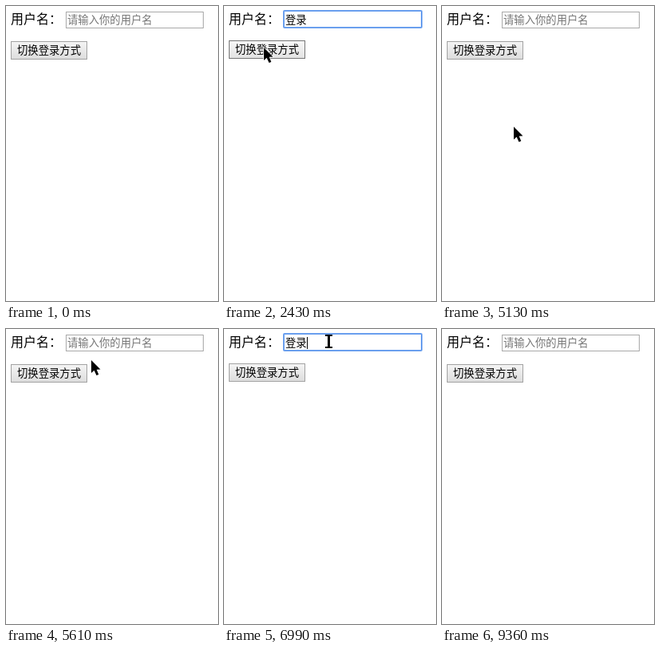
An HTML page with a canvas that plays this animation: 266x369 px, repeating every 9840 ms.

```html
<!DOCTYPE html>
<html lang="zh-CN">
<head>
<meta charset="utf-8">
<title>切换登录方式</title>
<style>
html, body { margin: 0; width: 100%; height: 100%; overflow: hidden; background: #fff; }
canvas { display: block; }
</style>
</head>
<body>
<canvas id="stage" width="266" height="369"></canvas>
<script>
const ctx = document.getElementById('stage').getContext('2d', { alpha: false });
const LOOP = 9840, TICK = 30, BLINK = 510, PRESS = 60;
const FONT = '"Noto Sans CJK SC", "Noto Sans CJK", sans-serif';
const ARROW = new Path2D('M0 0V16L3.6 12.7L6.5 19L9.3 18L6.7 11.7L11.5 11.5Z');
const BUTTON = { x: 6, w: 96, h: 23 }, FIELD = { w: 173, h: 21 };

// Two visits to the form: the first keeps its text when the login type changes, the second drops it.
const visits = [
  { focus: 510, type: 1920, toMail: 2820, toName: 3750, clear: 4800 },
  { focus: 6240, type: 6810, toMail: 7650, toName: 8370, clear: 7650 }
];

// Pointer moves: start, end, goal
const moves = [
  { from: 60, to: 330, x: 145, y: 20 },
  { from: 1230, to: 1350, x: 146, y: 18 },
  { from: 2100, to: 2400, x: 49, y: 51 },
  { from: 4770, to: 4800, x: 70, y: 164 },
  { from: 4800, to: 5130, x: 89, y: 150 },
  { from: 5130, to: 5610, x: 106, y: 38 },
  { from: 5610, to: 5910, x: 140, y: 9 },
  { from: 6060, to: 6210, x: 136, y: 13 },
  { from: 6960, to: 6990, x: 131, y: 15 },
  { from: 6990, to: 7140, x: 50, y: 52 },
  { from: 9180, to: 9360, x: 275, y: 31 }
];

const between = (t, a, b) => t >= a && t < b;
const ease = k => k * k * (3 - 2 * k);

function pointerAt(t) {
  let x = 228, y = 25;
  for (const m of moves) {
    const k = ease(Math.min(1, Math.max(0, (t - m.from) / (m.to - m.from))));
    x += (m.x - x) * k;
    y += (m.y - y) * k;
  }
  return { x: Math.round(x), y: Math.round(y) };
}

function fill(color, x, y, w, h) {
  ctx.fillStyle = color;
  ctx.fillRect(x, y, w, h);
}

function frame(color, x, y, w, h) {
  ctx.strokeStyle = color;
  ctx.lineWidth = 1;
  ctx.strokeRect(x + 0.5, y + 0.5, w - 1, h - 1);
}

function text(str, x, y, size, color) {
  ctx.font = '350 ' + size + 'px ' + FONT;
  ctx.fillStyle = color;
  ctx.fillText(str, x, y);
}

function drawField(x, y, value, hint, focus) {
  frame('#a9a9a9', x, y, FIELD.w, FIELD.h);
  if (focus) {
    ctx.strokeStyle = '#6a9fee';
    ctx.lineWidth = 2;
    ctx.beginPath();
    ctx.roundRect(x, y, FIELD.w, FIELD.h, 1);
    ctx.stroke();
  }
  text(value || hint, x + 2, 22, 13.333, value ? '#000' : '#757575');
}

function drawButton(y, hover, down) {
  const { x, w, h } = BUTTON;
  const shade = ctx.createLinearGradient(0, y, 0, y + h);
  const stops = down ? ['#d5d5d5', '#e9e9e9'] : hover ? ['#f8f8f8', '#e2e2e2'] : ['#f5f5f5', '#dcdcdc'];
  stops.forEach((c, i) => shade.addColorStop(i, c));
  fill(shade, x, y, w, h);
  frame(hover ? '#777' : '#a2a2a2', x, y, w, h);
  text('切换登录方式', x + 8, y + 16, 13.333, '#000');
}

function drawBeam(x, y) {
  fill('#000', x - 4, y - 8, 9, 2);
  fill('#000', x - 4, y + 7, 9, 2);
  fill('#000', x - 1, y - 7, 3, 15);
}

function drawArrow(x, y) {
  ctx.save();
  ctx.translate(x + 1, y + 1);
  ctx.strokeStyle = '#fff';
  ctx.lineWidth = 1.5;
  ctx.stroke(ARROW);
  ctx.fillStyle = '#000';
  ctx.fill(ARROW);
  ctx.restore();
}

function draw(t) {
  const v = visits[t < visits[0].clear ? 0 : 1];
  const hasText = between(t, v.type, v.clear);
  const isMail = between(t, v.toMail, v.toName);
  const focus = between(t, v.focus, v.toMail - PRESS);
  const down = [v.toMail, v.toName].some(end => between(t, end - PRESS, end));
  const caretStart = hasText ? v.type : v.focus;
  const caret = focus && Math.floor((t - caretStart) / BLINK) % 2 === 0;

  const shown = between(t, 90, 9360), p = pointerAt(t);
  const lift = hasText ? 1 : 0;
  const name = isMail ? '邮箱' : '用户名';
  const fieldX = isMail ? 59 : 75, fieldY = 7 - lift, buttonY = 44 - lift;
  const over = (x, y, box) => shown && between(p.x, x, x + box.w) && between(p.y, y, y + box.h);

  fill('#fff', 0, 0, 266, 369);
  text(name + '：', 6, 22, 16, '#000');
  drawField(fieldX, fieldY, hasText ? '登录' : '', '请输入你的' + name, focus);
  if (caret) fill('#000', fieldX + (hasText ? 29 : 2), 10, 1, 15);
  drawButton(buttonY, over(BUTTON.x, buttonY, BUTTON), down);

  if (!shown) return;
  if (over(fieldX, fieldY, FIELD)) drawBeam(p.x, p.y);
  else drawArrow(p.x, p.y);
}

function loop() {
  const t = performance.now() % LOOP;
  draw(Math.floor(t / TICK) * TICK);
  requestAnimationFrame(loop);
}
loop();
</script>
</body>
</html>
```
